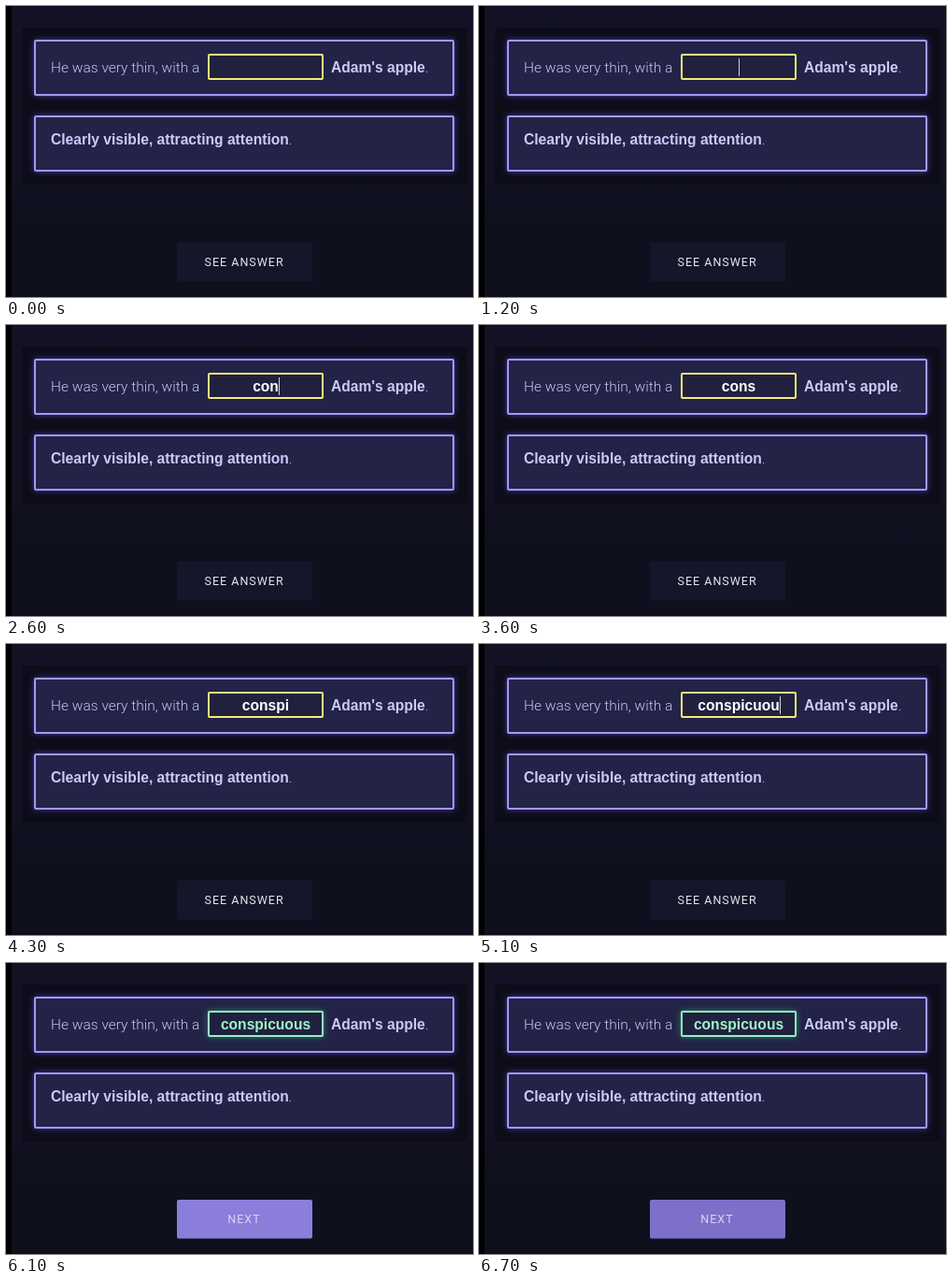
Write an HTML page that moves like this. It is 500 px wide and 311 px high and loops after 7.5 s.

```html
<!DOCTYPE html>
<html lang="en">
<head>
<meta charset="utf-8">
<title>Vocabulary card</title>
<style>
  html, body { margin: 0; width: 100%; height: 100%; overflow: hidden; background: #0f101e; }
  svg { display: block; width: 100vw; height: 100vh; }
  text { white-space: pre; }
  .light { font: 300 15.5px Roboto, sans-serif; fill: #c9c4f0; }
  .bold { font: 700 15.6px "Liberation Sans", Arial, sans-serif; fill: #cfc8f8; }
  .label { font: 400 12.5px Roboto, sans-serif; letter-spacing: 1px; }
  .card { fill: #222347; stroke: #a597f4; stroke-width: 2; filter: drop-shadow(0 0 3px #5a45c4cc); }
  .solved { filter: drop-shadow(0 0 3px #3fae7caa); }
</style>
</head>
<body>
<svg viewBox="0 0 500 311" preserveAspectRatio="none">
  <defs>
    <linearGradient id="backdrop" x1="0" y1="0" x2="0" y2="1">
      <stop offset="0" stop-color="#121224"/>
      <stop offset=".6" stop-color="#111121"/>
      <stop offset=".75" stop-color="#0f101e"/>
      <stop offset="1" stop-color="#0f101e"/>
    </linearGradient>
  </defs>
  <rect width="500" height="311" fill="url(#backdrop)"/>
  <rect width="6" height="311" fill="#020205"/>
  <rect x="17" y="23" width="477" height="168" fill="#0d0d1a"/>

  <rect class="card" x="31" y="37" width="448" height="58" rx="1"/>
  <rect class="card" x="31" y="118" width="448" height="58" rx="1"/>
  <text class="light" x="48" y="70.5">He was very thin, with a</text>
  <text class="bold" x="348" y="70.5">Adam's apple<tspan class="light">.</tspan></text>
  <text class="bold" x="48" y="148">Clearly visible, attracting attention<tspan class="light">.</tspan></text>

  <rect id="field" x="217" y="52" width="122" height="26" rx="1" fill="#20213f" stroke-width="2"/>
  <text id="answer" class="bold" x="278" y="70.5" text-anchor="middle"></text>
  <rect id="caret" y="56" width="1" height="19" fill="#d0d0e0"/>

  <rect id="button" x="183" y="253" width="145" height="41.5"/>
  <text id="label" class="label" y="278"></text>
</svg>
<script>
  const LOOP = 7500, SOLVED_AT = 5300, WORD = "conspicuous";
  const $ = id => document.getElementById(id);
  const set = (id, attrs) => {
    for (const key in attrs) $(id).setAttribute(key, attrs[key]);
  };

  // [start in ms, letters typed, caret visible]
  const typing = [
    [0, 0, false], [1200, 0, true], [1700, 0, false], [2200, 0, true],
    [2300, 1, false], [2500, 2, false], [2600, 3, true], [3100, 3, false],
    [3600, 4, false], [3700, 5, false], [3800, 6, true], [4300, 6, false],
    [4500, 8, false], [4700, 9, true], [5100, 10, true], [SOLVED_AT, 11, false]
  ];

  function render(t) {
    const [, letters, caretOn] = typing.findLast(step => step[0] <= t);
    const solved = t >= SOLVED_AT;
    const bright = t >= 6100 && t < 6700;

    $("answer").textContent = WORD.slice(0, letters);
    $("answer").style.fill = solved ? "#a0f3c9" : "#fff";
    const width = letters ? $("answer").getComputedTextLength() : 0;
    set("caret", { x: Math.round(278 + width / 2), visibility: caretOn ? "visible" : "hidden" });
    set("field", { stroke: solved ? "#94f0c2" : "#f4e97c", class: solved ? "solved" : "" });

    set("button", {
      fill: !solved ? "#15162a" : bright ? "#8b7edb" : "#7d70c8",
      rx: solved ? 2 : 0
    });
    $("label").textContent = solved ? "NEXT" : "SEE ANSWER";
    set("label", { x: solved ? 237.3 : 212.5, fill: solved ? "#d9d3f5" : "#e6e3ea" });
  }

  const start = performance.now();
  function frame() {
    render((performance.now() - start) % LOOP);
    requestAnimationFrame(frame);
  }
  frame();
</script>
</body>
</html>
```
